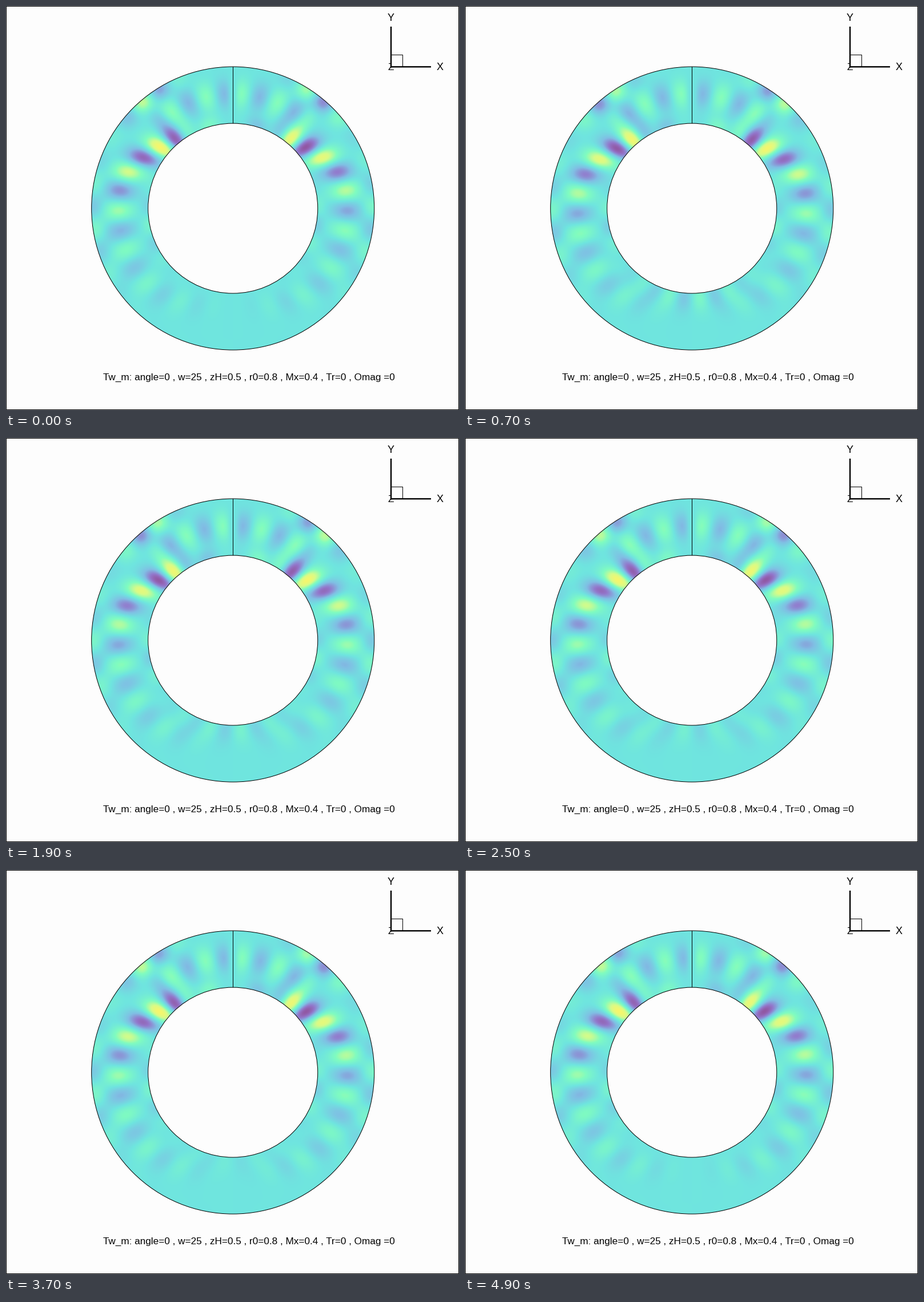
A matplotlib script for the animation above (5 s loop, 793x706 px).

```python
import numpy as np
import matplotlib.pyplot as plt
from matplotlib.animation import FuncAnimation
from matplotlib.colors import LinearSegmentedColormap
from matplotlib.patches import Circle, Rectangle

W, H, DPI = 793, 706, 100
FRAMES, INTERVAL, CYCLES = 50, 100, 4
CX, CY, R_OUT, R_IN = 397.2, 353.6, 247.5, 148.5
PAGE = "#fdfdfd"

plt.rcParams["font.family"] = "Liberation Sans"

pressure_map = LinearSegmentedColormap.from_list(
    "pressure", ["#914e98", "#9378cc", "#80bfe4", "#6fe5df",
                 "#80fcc0", "#d8fb88", "#fff564"], N=512)


def ease(x, start, end):
    s = np.clip((x - start) / (end - start), 0, 1)
    return s * s * (3 - 2 * s)


def bump(x, centre, width):
    return np.exp(-((x - centre) / width) ** 2)


def beam(r, amplitude, half_turns, centre, width):
    return amplitude * bump(r, centre, width) * np.exp(1j * np.pi * half_turns)


def outgoing(r, th):
    """Complex amplitude of the wave running from the top down one side."""
    # Crests count from 0 at 39 degrees to 14 at the bottom.
    x = (th - 39) / 141
    crest = 14 * np.sign(x) * np.abs(x) ** 1.04
    # The main beam leaves the hub, then settles in mid-channel.
    strength = .95 * np.exp(-(th - 50) / 55) / (1 + np.exp(-(th - 36) / 4))
    path = .64 + .17 * ease(th, 38, 82) - .15 * ease(th, 125, 180)
    main = beam(r, strength, crest, path, .11)

    outer = beam(r, .6 * bump(th, 38, 13) + .27 * bump(th, 95, 28),
                 (th - 31) / 9.7, .985, .075)
    middle = beam(r, .36 * (1 - ease(th, 34, 48)), (th - 42) / 9.5, .81, .1)
    hub = (beam(r, .28 * bump(th, 17, 10), (th - 38) / 22, .61, .06)
           + beam(r, .2 * bump(th, 100, 25), (th - 3) / 14, .6, .06)
           + beam(r, .2 * bump(th, 180, 40), crest, .63, .09))
    return main + outer + middle + hub


X0, Y0, SIZE = 149, 105, 498
px, py = np.meshgrid(np.arange(SIZE) + X0 + .5, np.arange(SIZE) + Y0 + .5)
dx, dy = px - CX, CY - py
radius = np.hypot(dx, dy) / R_OUT
angle = np.degrees(np.arctan2(np.abs(dx), dy))

# Odd about the vertical axis; both sides overlap and interfere at the bottom.
wave = outgoing(radius, angle) - outgoing(radius, 360 - angle)
wave *= np.sign(dx) * (1 - bump(angle, 0, 2.2))

fig = plt.figure(figsize=(W / DPI, H / DPI), dpi=DPI, facecolor=PAGE)
ax = fig.add_axes([0, 0, 1, 1])
ax.axis("off")


def points(pixels):
    return pixels * 72 / DPI


def stroke(xs, ys, width=1):
    ax.plot(xs, ys, color="black", lw=points(width), zorder=4,
            solid_capstyle="butt", snap=False)


def outline(patch, fill="none"):
    patch.set(facecolor=fill, edgecolor="black", linewidth=points(1),
              zorder=3, snap=False)
    ax.add_patch(patch)


def label(x, y, text, size, ha="center"):
    ax.text(x, y, text, fontsize=points(size), ha=ha, va="baseline",
            color="black", zorder=2)


field = ax.imshow(wave.real, cmap=pressure_map, vmin=-1, vmax=1,
                  extent=(X0, X0 + SIZE, Y0 + SIZE, Y0), aspect="auto",
                  interpolation="nearest", zorder=1)
ax.set_xlim(0, W)
ax.set_ylim(H, 0)
field.set_clip_path(Circle((CX, CY), R_OUT, transform=ax.transData))

outline(Circle((CX, CY), R_IN), PAGE)
outline(Circle((CX, CY), R_OUT))
stroke([397.5, 397.5], [CY - R_OUT, CY - R_IN])
outline(Rectangle((.5, .5), W - 1, H - 1))

# Axis triad
label(674, 112, "Z", 17)
outline(Rectangle((674.5, 85.5), 20, 21), PAGE)
stroke([674, 674], [36, 107.5], 2.4)
stroke([673, 744], [106.3, 106.3], 2.4)
label(673.5, 26, "Y", 18)
label(759.5, 112, "X", 18)

label(169.7, 654, "Tw_m: angle=0 , w=25 , zH=0.5 , r0=0.8 , Mx=0.4 , Tr=0 , Omag =0",
      17.18, ha="left")


def update(frame):
    turns = CYCLES * frame / (FRAMES - 1)
    field.set_data((wave * np.exp(-2j * np.pi * turns)).real)
    return (field,)


animation = FuncAnimation(fig, update, frames=FRAMES, interval=INTERVAL,
                          repeat=True, repeat_delay=0, blit=False)
plt.show()
```
